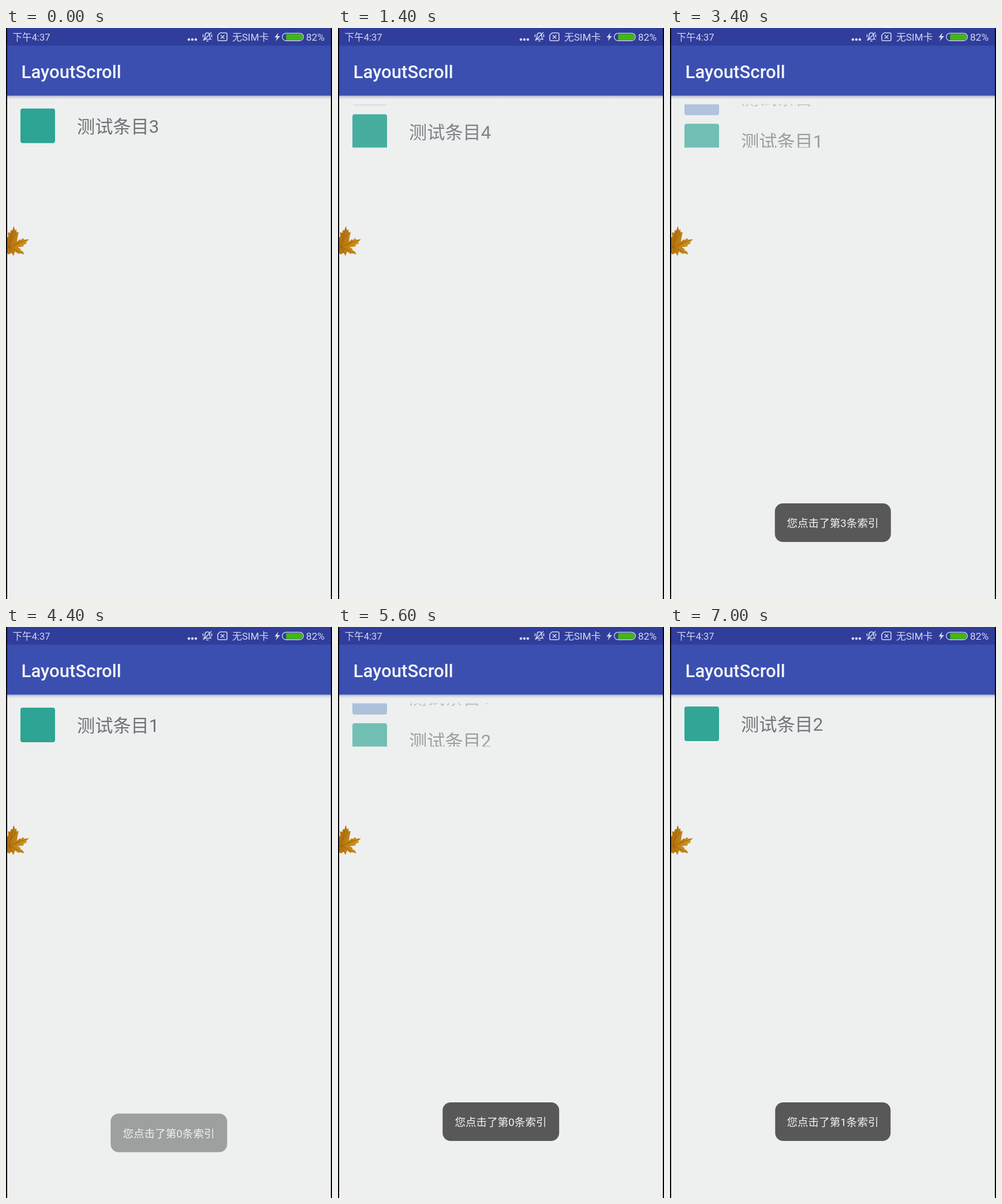
Write an HTML page that moves like this. It is 565 px wide and 991 px high and loops after 7200 ms.

```html
<!DOCTYPE html>
<html lang="zh">
<head>
<meta charset="utf-8">
<title>LayoutScroll</title>
<style>
html, body { margin: 0; width: 100%; height: 100%; overflow: hidden; background: #eeefef; }
svg { display: block; width: 565px; height: 991px; font-family: Roboto, "Noto Sans CJK SC", "Noto Sans CJK", sans-serif; }
</style>
</head>
<body>
<svg viewBox="0 0 565 991" xmlns="http://www.w3.org/2000/svg">
  <defs>
    <clipPath id="window"><rect x="2" y="132.5" width="561" height="75"/></clipPath>
    <linearGradient id="shade" x2="0" y2="1">
      <stop stop-color="#b4bad0"/>
      <stop offset=".45" stop-color="#d6d9e1"/>
      <stop offset="1" stop-color="#eeefef"/>
    </linearGradient>
    <linearGradient id="autumn" x2="1" y2=".3">
      <stop stop-color="#a9690f"/>
      <stop offset=".6" stop-color="#c48514"/>
      <stop offset="1" stop-color="#d09426"/>
    </linearGradient>
  </defs>

  <rect width="565" height="991" fill="#eeefef"/>
  <rect y="117.500" width="565" height="6.500" fill="url(#shade)"/>
  <rect y="30" width="565" height="87.500" fill="#3a4fb0"/>
  <rect width="565" height="30.5" fill="#303d9b"/>
  <text x="26.500" y="86.500" font-size="31.200" font-weight="500" fill="#f4f5fa">LayoutScroll</text>

  <!-- status bar -->
  <g fill="#d3d8ef" font-size="17">
    <text x="11.5" y="22" font-size="16.6">下午4:37</text>
    <text x="392" y="22">无SIM卡</text>
    <text x="520" y="22" font-size="17.4">82%</text>
    <circle cx="317" cy="20" r="2.3"/>
    <circle cx="323" cy="20" r="2.3"/>
    <circle cx="329" cy="20" r="2.3"/>
    <path d="M472 8L465.5 16.5H469.5L467.5 23L475 14H470.5Z"/>
  </g>
  <g fill="none" stroke="#d3d8ef" stroke-width="1.6">
    <path d="M343 19.5Q345 17.5 345 13Q345 8.5 349 8.5Q353 8.5 353 13Q353 17.5 355 19.5ZM347 22.5H351M342 22L356 7.5M341.5 11V16M356.5 11V16"/>
    <path d="M371 8.5H381Q383 8.5 383 10.5V20Q383 22 381 22H369Q367 22 367 20V12.5ZM372 12.5L378.5 18.5M378.5 12.5L372 18.5"/>
    <rect x="478.7" y="9.2" width="36.8" height="12.8" rx="6.4" stroke-width="1.3"/>
  </g>
  <path d="M485.5 10.5H509.5A5.1 5.1 0 0 1 509.5 20.7H485.5Z" fill="#42b713"/>

  <!-- leaf at the left edge -->
  <path fill="url(#autumn)" d="M2 364L4 362L3.500 354L7 356L9 350L11 352L13.500 343.500L15.500 351L18 349.500L18.500 355L22 354L20 363L19 371L24 366.500L26 368.500L29 364.500L32 367.500L40 366.500L35 371.500L36 374L30 376.500L31 379L24 380L20 380.500L25 383L25 385.500L29 387.500L32 393L25 391L21 392L16 388L14.500 391L13 396L10 390L5 393L2 391Z"/>
  <path fill="none" stroke="#85500c" stroke-width=".9" opacity=".7" d="M5 380L13.500 347M8 370L18 355M5 380L38 367.500M16 376L27 368M5 380L30 391.500M5 380L12 393M2 382L5 380"/>

  <g clip-path="url(#window)" id="rows"></g>

  <g id="toast">
    <rect id="box" y="825" height="67" rx="14" fill="#585858"/>
    <text id="note" x="282" y="866" font-size="18.600" text-anchor="middle" fill="#f4f4f4"></text>
  </g>

  <path d="M0 0H2V991H0ZM563 0H565V991H563Z" fill="#03040c"/>
</svg>
<script>
const LOOP = 7200, STEP = 200, PITCH = 75, FLIP = 1900;
const flips = [-54, 2265, 4479, 6800];
const labels = [3, 4, 1, 2, 3];
const toasts = [
  { index: 3, from: 2050, to: 3900, width: 201 },
  { index: 0, from: 4290, to: 6250, width: 202 },
  { index: 1, from: 6450, to: 9000, width: 200 }
];
const FADE = 210, RISE = 41;
const TEAL = [45, 164, 148], BLUE = [63, 105, 189];

const $ = id => document.getElementById(id);
const clamp = x => Math.max(0, Math.min(1, x));
const ease = x => (1 - Math.cos(Math.PI * clamp(x))) / 2;
const mix = (a, b, k) => `rgb(${a.map((v, i) => Math.round(v + (b[i] - v) * k))})`;

function make(tag, attrs, parent) {
  const el = document.createElementNS("http://www.w3.org/2000/svg", tag);
  for (const key in attrs) el.setAttribute(key, attrs[key]);
  return parent.appendChild(el);
}

function makeRow() {
  const g = make("g", {}, $("rows"));
  const icon = make("rect", { x: 25, y: 140, width: 60, height: 60, rx: 4 }, g);
  const text = make("text", { x: 123, y: 182, "font-size": 31.2, fill: "#6e7277" }, g);
  return { g, icon, text };
}

function setRow(row, number, dy, alpha, tint) {
  row.g.setAttribute("transform", `translate(0 ${dy})`);
  row.g.setAttribute("opacity", alpha);
  row.icon.setAttribute("fill", mix(TEAL, BLUE, tint));
  row.text.textContent = "测试条目" + number;
}

const leaving = makeRow(), entering = makeRow();

function draw(t) {
  const n = flips.filter(start => start <= t).length - 1;
  const p = ease((t - flips[n]) / FLIP);
  setRow(leaving, labels[n], -p * PITCH, 1 - p, clamp(p * 1.6 - 0.15));
  setRow(entering, labels[n + 1], (1 - p) * PITCH, p, 0);

  const toast = toasts.find(o => t >= o.from && t < o.to + FADE);
  const show = toast ? Math.min(clamp((t - toast.from) / FADE), clamp((toast.to + FADE - t) / FADE)) : 0;
  $("toast").setAttribute("opacity", show);
  if (!toast) return;
  $("toast").setAttribute("transform", `translate(0 ${(1 - show) * RISE})`);
  $("box").setAttribute("x", 282.3 - toast.width / 2);
  $("box").setAttribute("width", toast.width);
  $("note").textContent = `您点击了第${toast.index}条索引`;
}

const origin = performance.now();
function tick() {
  const t = (performance.now() - origin) % LOOP;
  draw(Math.floor(t / STEP) * STEP);
  requestAnimationFrame(tick);
}
tick();
</script>
</body>
</html>
```
